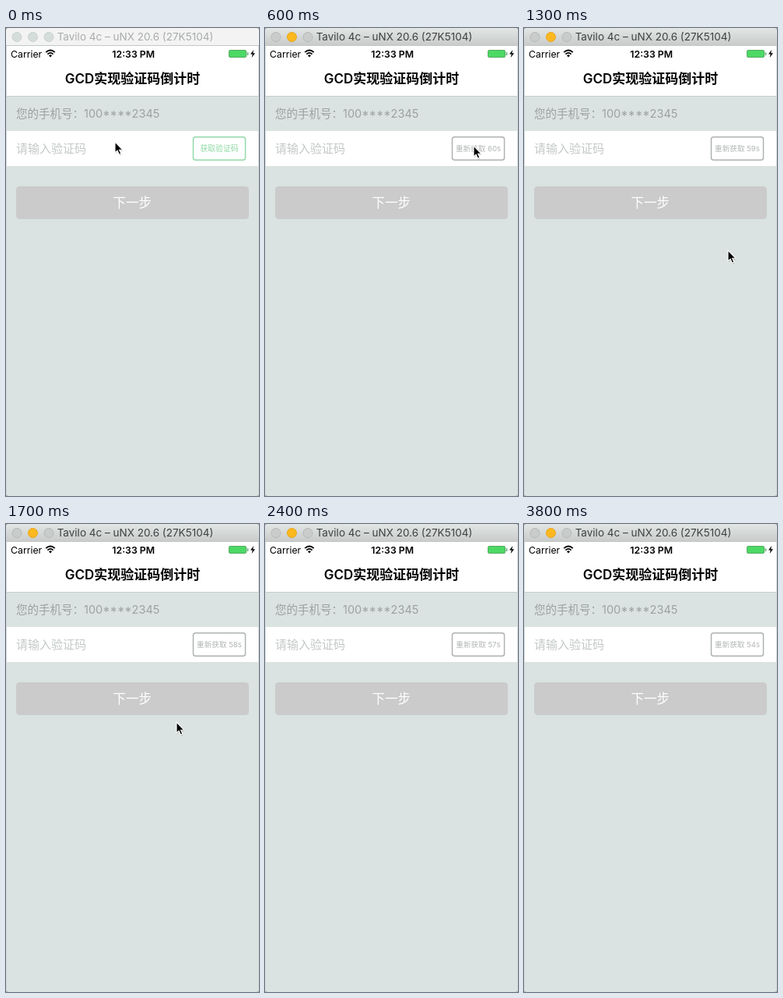
An HTML page for the animation above (3900 ms loop, 325 by 600 pixels).

```html
<!DOCTYPE html>
<html lang="zh-CN">
<head>
<meta charset="utf-8">
<title>GCD实现验证码倒计时</title>
<style>
  html, body { margin: 0; width: 325px; height: 600px; overflow: hidden; background: #a3aaa8; }
  svg { display: block; font-family: Inter, "Noto Sans CJK SC", "Noto Sans CJK JP", sans-serif; }
  .mid { text-anchor: middle; }
  #bar { fill: #f3f3f3; }
  #device { fill: #a9acab; font-size: 13.5px; }
  .light { fill: #d5dddb; stroke: #cbd3d1; }
  #code rect { fill: #fff; stroke: #93d9a9; stroke-width: 1.5; }
  #code text { fill: #8bd8a3; font-size: 9.8px; font-weight: 500; }
  .active #bar { fill: url(#chrome); }
  .active #device { fill: #3f4140; }
  .active .light { fill: #c9cccb; stroke: #b5b9b8; }
  .active .light.min { fill: #fcb81f; stroke: #e5a51c; }
  .active #code rect { stroke: #aeb2b1; }
  .active #code text { fill: #b2b5b4; font-size: 9.6px; font-weight: 400; }
</style>
</head>
<body>
<svg id="stage" width="325" height="600" viewBox="0 0 325 600">
  <defs>
    <linearGradient id="chrome" x2="0" y2="1">
      <stop stop-color="#e2e6e5"/>
      <stop offset="1" stop-color="#c9cbcb"/>
    </linearGradient>
    <clipPath id="window"><rect width="325" height="600" rx="4"/></clipPath>
  </defs>

  <g clip-path="url(#window)">
    <rect width="325" height="600" fill="#dae3e1"/>
    <rect id="bar" width="325" height="22"/>
    <path d="M0 22.5H325" stroke="#c3c7c6"/>
    <circle class="light" cx="14" cy="11.5" r="6"/>
    <circle class="light min" cx="34.5" cy="11.5" r="6"/>
    <circle class="light" cx="55" cy="11.5" r="6"/>
    <text id="device" class="mid" x="166" y="16">Tavilo 4c – uNX 20.6 (27K5104)</text>

    <path d="M0 23H325V87H0Z" fill="#fff"/>
    <path d="M0 87.5H325" stroke="#c5cbca"/>
    <text x="6" y="37.5" font-size="12.3">Carrier</text>
    <g fill="none" stroke="#000" stroke-width="1.8">
      <path d="M51.3 31.2Q57 25.7 62.7 31.2M53.4 33.6Q57 30.1 60.6 33.6"/>
      <path d="M55 35.2Q57 33.4 59 35.2L57 37.4Z" fill="#000" stroke="none"/>
    </g>
    <text class="mid" x="163.7" y="37.5" font-size="12.3" font-weight="600">12:33 PM</text>
    <rect x="286.5" y="28.5" width="22" height="9" rx="1.5" fill="#4cd964" stroke="#58a866"/>
    <path d="M310.5 31.2V35" stroke="#58a866" stroke-width="1.5"/>
    <path d="M318.2 28L314 33.6H316.7L315.6 38L320 32.2H317.2Z"/>
    <text class="mid" x="162.5" y="71.2" font-size="17" font-weight="600">GCD实现验证码倒计时</text>

    <text x="13" y="115.4" font-size="14.5" fill="#9ca1a0">您的手机号：100****2345</text>
    <path d="M0 132H325V177H0Z" fill="#fff"/>
    <text x="13" y="160.4" font-size="15" fill="#c3c8c7">请输入验证码</text>
    <g id="code">
      <rect x="240.5" y="139.7" width="67" height="29.6" rx="3"/>
      <text id="label" class="mid" x="274" y="158.2"></text>
    </g>

    <rect x="13" y="203" width="299" height="42" rx="4.5" fill="#cbcbcb"/>
    <text class="mid" x="162.3" y="230.3" font-size="16.5" fill="#fff">下一步</text>
    <path d="M.5 23V600M324.5 23V600" stroke="#d0d8d6"/>
  </g>

  <g id="cursor">
    <path d="M0 0V14L3.1 11.2 5.4 16.3 7.9 15.2 5.6 10.2H9.8Z" transform="translate(.5 1.5)" opacity=".2"/>
    <path d="M0 0V14L3.1 11.2 5.4 16.3 7.9 15.2 5.6 10.2H9.8Z" stroke="#fff" stroke-width="1.1"/>
  </g>
</svg>
<script>
  const LOOP = 3900, STEP = 100, CLICK = 600, TICK = 510;
  // time, x, y of the pointer tip
  const path = [
    [0, 140, 146], [400, 268, 151], [650, 268, 151], [900, 276, 294],
    [1300, 262, 285], [1700, 219, 254], [2200, 205, 615]
  ];
  const $ = id => document.getElementById(id);
  const stage = $('stage'), label = $('label'), cursor = $('cursor');

  function pointer(t) {
    const next = path.findIndex(p => p[0] > t);
    if (next < 0) return path[path.length - 1].slice(1);
    const [t0, x0, y0] = path[next - 1], [t1, x1, y1] = path[next];
    const u = (t - t0) / (t1 - t0), e = u * u * (3 - 2 * u);
    return [x0 + (x1 - x0) * e, y0 + (y1 - y0) * e];
  }

  function draw() {
    const t = Math.floor((performance.now() % LOOP) / STEP) * STEP;
    const active = t >= CLICK;
    stage.classList.toggle('active', active);
    label.textContent = active
      ? `重新获取 ${60 - Math.floor((t - CLICK) / TICK)}s`
      : '获取验证码';
    cursor.setAttribute('transform', `translate(${pointer(t)})`);
    requestAnimationFrame(draw);
  }
  draw();
</script>
</body>
</html>
```
